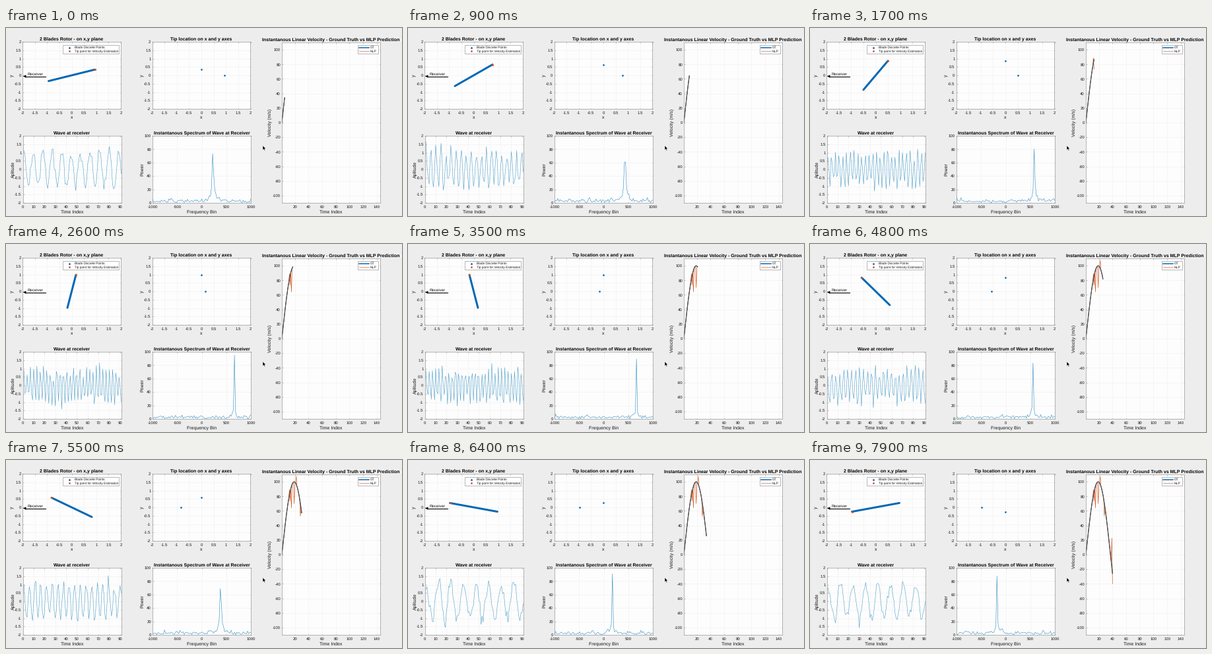
Write a matplotlib script that moves like this. It is 600 px wide and 286 px high and loops after 8 s.

```python
import numpy as np
import matplotlib.pyplot as plt
from matplotlib.animation import FuncAnimation
from matplotlib.patches import Polygon, Rectangle

W, H, DPI = 600, 286, 100
FRAMES, INTERVAL = 80, 100
N = 91            # samples per received burst
FS = 2000.0       # sampling rate
DOPPLER = 2000 / 3
BLUE, ORANGE, INK, EDGE = "#0068b5", "#d95319", "#161616", "#8c8c8c"

plt.rcParams.update({"font.family": "Liberation Sans",
                     "axes.unicode_minus": False,
                     "text.hinting": "no_hinting"})


def pt(px):
    return px * 72 / DPI


fig = plt.figure(figsize=(W / DPI, H / DPI), dpi=DPI, facecolor="#ededed")

# Overlay in pixel coordinates, y pointing down
top = fig.add_axes([0, 0, 1, 1], zorder=5)
top.set(xlim=(0, W), ylim=(H, 0))
top.axis("off")


def text(x, y, s, size=7.0, **kw):
    opts = dict(ha="center", va="baseline", color=INK)
    opts.update(kw)
    top.text(x, y, s, fontsize=pt(size), **opts)


def panel(x, y, w, h, title, labels, xlim, ylim, xstep, ystep, gutter=15):
    ax = fig.add_axes([x / W, 1 - (y + h) / H, w / W, h / H])
    ax.set(xlim=xlim, ylim=ylim, facecolor="#fdfdfd")
    for axis, (lo, hi), step in ((ax.xaxis, xlim, xstep),
                                 (ax.yaxis, ylim, ystep)):
        ticks = np.arange(np.ceil(lo / step), hi // step + 1) * step
        axis.set_ticks(ticks, [f"{v + 0:g}" for v in ticks])
    ax.tick_params(direction="in", top=True, right=True, length=pt(1.5),
                   width=pt(0.5), color=EDGE, labelcolor=INK,
                   labelsize=pt(6))
    ax.tick_params(axis="x", pad=pt(3.2))
    ax.tick_params(axis="y", pad=pt(2))
    ax.grid(color="#f0f0f0", lw=pt(0.6))
    ax.set_axisbelow(True)
    for side in ax.spines.values():
        side.set(linewidth=pt(0.6), color=EDGE)
    text(x + w / 2, y - 2.5, title, weight="bold", color="black")
    text(x + w / 2, y + h + 15.5, labels[0])
    text(x - gutter, y + h / 2, labels[1], rotation=90, va="center")
    return ax


def legend(x, y, w, key, rows):
    top.add_patch(Rectangle((x, y), w, 13.3, fc="white", ec=EDGE, lw=pt(0.6)))
    for i, (name, style) in enumerate(rows):
        row = y + 4.1 + 5.8 * i
        top.plot([x + 2, x + 2 + key], [row, row], **style)
        text(x + key + 3.5, row + 1.8, name, 4.8, ha="left")


square = dict(xlim=(-2, 2), ylim=(-2, 2), xstep=0.5, ystep=0.5)
blade_ax = panel(25, 21, 149, 102, "2 Blades Rotor - on x,y plane",
                 "xy", **square)
tip_ax = panel(221.5, 21, 149, 102, "Tip location on x and y axes",
               "xy", **square)
wave_ax = panel(25.5, 164, 149, 102, "Wave at receiver",
                ("Time Index", "Aplitude"), (0, N), (-2, 2), 10, 0.5)
spec_ax = panel(222, 164, 149, 102,
                "Instantanous Spectrum of Wave at Receiver",
                ("Frequency Bin", "Power"), (-1000, 1000), (0, 100), 500, 20)
vel_ax = panel(418, 22, 149, 244, "Instantanous Linear Velocity"
               " - Ground Truth vs MLP Prediction",
               ("Time Index", "Velocity (m/s)"), (1, 145), (-110, 110),
               20, 20, gutter=18.5)


def dot(color):
    return dict(color=color, marker="o", ms=pt(2.8), mew=0, lw=0, markevery=2)


legend(86, 25.5, 85.3, 14.5, [])
for i, (name, color) in enumerate([
        ("Blade Discrete Points", BLUE),
        ("Tip point for Velocity Estimation", ORANGE)]):
    row = 29.6 + 5.8 * i
    top.plot(95.5, row, **dot(color))
    text(104, row + 1.8, name, 4.8, ha="left")
legend(533, 25.5, 31, 15, [("GT", dict(color=BLUE, lw=pt(1.5))),
                           ("MLP", dict(color=ORANGE, lw=pt(0.6)))])

# Receiver arrow and mouse pointer
text(44.5, 72, "Receiver", 6.1)
top.plot([29, 59.5], [73.5, 73.5], color="black", lw=pt(1.1))
top.add_patch(Polygon([(25.8, 73.5), (30.5, 71.3), (30.5, 75.7)],
                      fc="black", lw=0))
pointer = np.array([(0, 0), (0, 7), (1.6, 5.6), (2.7, 8.2), (3.8, 7.7),
                    (2.7, 5.2), (4.9, 5.1)])
top.add_patch(Polygon(pointer + (389, 178.7), fc="black", ec="white",
                      lw=pt(0.5)))

# Moving parts
blade, = blade_ax.plot([], [], color=BLUE, lw=pt(3), solid_capstyle="round")
tip, = blade_ax.plot([], [], "o", color=ORANGE, ms=pt(3.1), mew=0)
tips, = tip_ax.plot([], [], "o", color=BLUE, ms=pt(2.7), mew=0)
wave, = wave_ax.plot([], [], color="#4a9cc8", lw=pt(0.55))
spec, = spec_ax.plot([], [], color="#3a93c6", lw=pt(0.6))
gt, = vel_ax.plot([], [], color=BLUE, lw=pt(1.0))
mlp, = vel_ax.plot([], [], color=ORANGE, lw=pt(0.65))
core, = vel_ax.plot([], [], color="#484848", lw=pt(1.0))

# The prediction follows the truth except for a few outliers
index = np.arange(1, 41)
speed = 100 * np.sin(np.radians(5 * (index - 1)))
error = np.zeros(len(index))
for i, e in [(12, 7), (13, -13), (15, -30), (19, -30), (22, 11), (28, -18),
             (39, 40), (40, -14)]:
    error[i - 1] = e
guess = speed + error

samples = np.arange(N)
bins = np.linspace(-FS / 2, FS / 2, N)


def burst(k):
    rng = np.random.default_rng(100 + k)
    freq = DOPPLER * np.sin(np.radians(5 * k))
    noise = rng.normal(0, 0.22, N) + 1j * rng.normal(0, 0.22, N)
    return np.exp(2j * np.pi * freq * samples / FS) + noise


def update(n):
    k = (4 * n + 41) // 9     # one 5 degree step every 225 ms
    a = np.radians(5 * k)
    x, y = np.cos(a), np.sin(a)
    blade.set_data([-x, x], [-y, y])
    tip.set_data([x], [y])
    tips.set_data([x, 0], [0, y])
    signal = burst(k)
    wave.set_data(samples + 1, signal.real)
    spec.set_data(bins, np.abs(np.fft.fftshift(np.fft.fft(signal))))
    m = k + 1
    for line, values in ((gt, speed), (mlp, guess), (core, speed)):
        line.set_data(index[:m], values[:m])
    return blade, tip, tips, wave, spec, gt, mlp, core


anim = FuncAnimation(fig, update, frames=FRAMES, interval=INTERVAL,
                     repeat=True, repeat_delay=0, blit=False)
plt.show()
```
